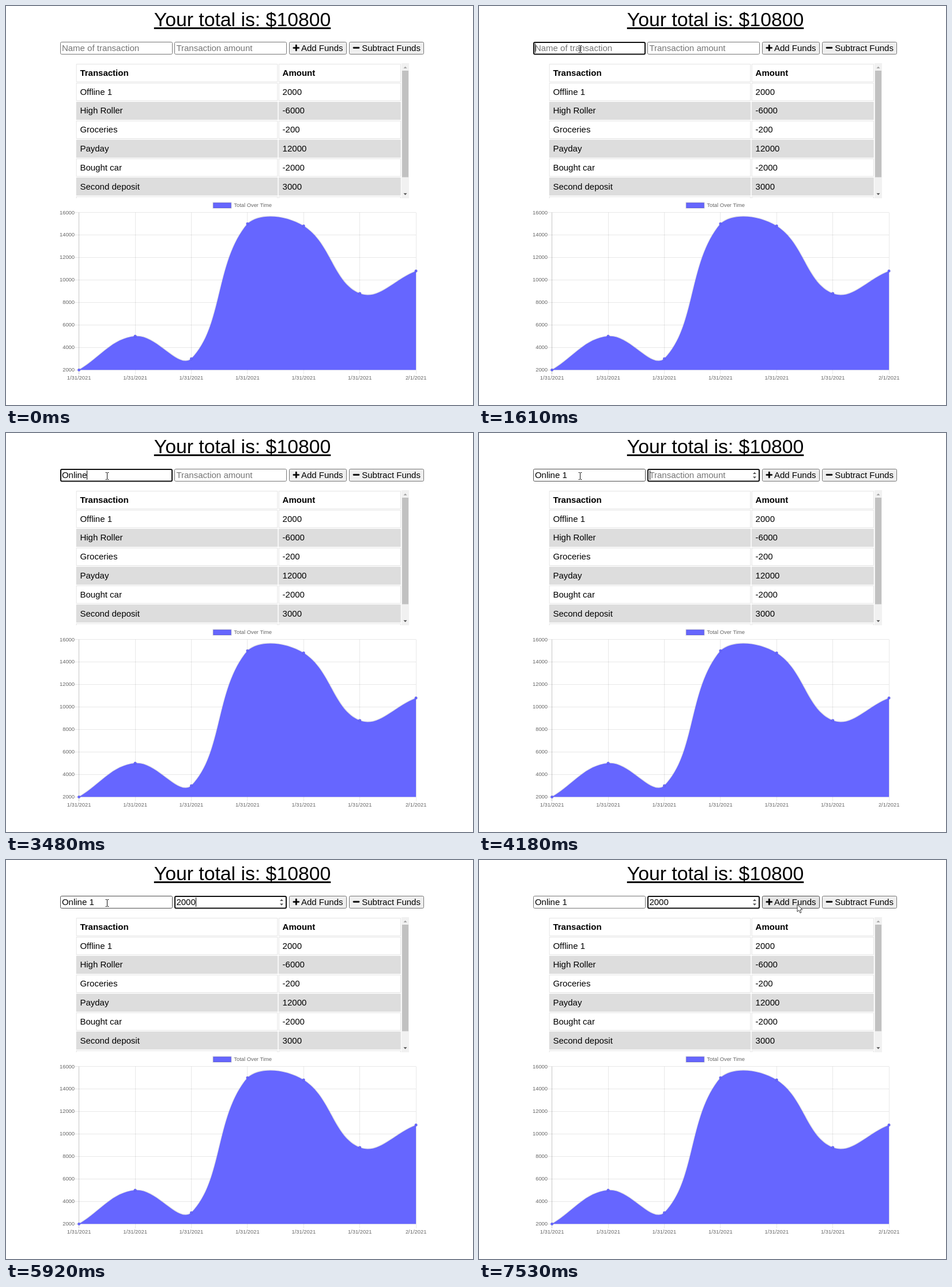
These frames come from a looping animation (810x691 px, 8 s). An HTML page with a canvas:

```html
<!DOCTYPE html>
<html lang="en">
<head>
<meta charset="utf-8">
<title>Budget tracker</title>
<style>
html, body { margin: 0; width: 100%; height: 100%; overflow: hidden; background: #fff; }
canvas { position: absolute; left: 0; top: 0; }
h1 {
  position: absolute; left: 10px; top: 5px; width: 800px; margin: 0;
  font: 33.75px/37px Arial, "Liberation Sans", sans-serif;
  text-align: center; text-decoration: underline;
}
</style>
</head>
<body>
<canvas id="stage" width="810" height="691"></canvas>
<h1>Your total is: $10800</h1>
<script>
const ctx = document.getElementById('stage').getContext('2d');
const LOOP = 8000;
const FAMILY = 'Arial, "Liberation Sans", sans-serif';
const PURPLE = '#6666ff';

// Each entry holds from its time until the next one.
const pointer = [
  [900, 769, 306], [980, 705, 286], [1060, 545, 228], [1130, 372, 164],
  [1210, 238, 111], [1290, 180, 83.5], [1360, 177, 79], [1440, 175.5, 75], [1520, 175.5, 74.5],
  [6600, 245, 165], [6680, 339, 264], [6910, 400, 244], [6990, 446, 205],
  [7070, 488, 160], [7150, 519, 122], [7220, 538, 97], [7300, 548, 83], [7380, 552, 77]
];
const nameTyping = [[0, ''], [2700, 'O'], [3020, 'On'], [3090, 'Onl'], [3260, 'Onli'],
  [3480, 'Online'], [3880, 'Online '], [3950, 'Online 1']];
const amountTyping = [[0, ''], [5050, '2'], [5520, '20'], [5750, '200'], [5920, '2000']];
const caretTimes = [[1610, 2140], [2600, 4730], [5050, 6450], [6990, 7530]];
const rows = [
  ['Transaction', 'Amount'], ['Offline 1', '2000'], ['High Roller', '-6000'], ['Groceries', '-200'],
  ['Payday', '12000'], ['Bought car', '-2000'], ['Second deposit', '3000'], ['', '']
];
const totals = [2000, 5000, 3000, 15000, 14800, 8800, 10800];

const at = (list, t) => list.filter(k => k[0] <= t).pop();

function text(str, x, y, color = '#000', size = 15, align = 'left', weight = '') {
  ctx.font = `${weight} ${size}px ${FAMILY}`;
  ctx.fillStyle = color;
  ctx.textAlign = align;
  ctx.fillText(str, x, y);
}

function rect(x, y, w, h, color) {
  ctx.fillStyle = color;
  ctx.fillRect(x, y, w, h);
}

function shape(points, fill, stroke, width = 1) {
  ctx.beginPath();
  points.forEach(p => ctx.lineTo(...p));
  ctx.closePath();
  ctx.fillStyle = fill;
  ctx.fill();
  if (!stroke) return;
  ctx.strokeStyle = stroke;
  ctx.lineWidth = width;
  ctx.stroke();
}

function box(x, y, w, h, fill, stroke, width = 1, radius = 2) {
  ctx.beginPath();
  ctx.roundRect(x, y, w, h, radius);
  ctx.fillStyle = fill;
  ctx.fill();
  ctx.strokeStyle = stroke;
  ctx.lineWidth = width;
  ctx.stroke();
}

function line(x1, y1, x2, y2, color, width = 1) {
  ctx.beginPath();
  ctx.moveTo(x1, y1);
  ctx.lineTo(x2, y2);
  ctx.strokeStyle = color;
  ctx.lineWidth = width;
  ctx.stroke();
}

function triangle(x, y, h, color, half = 3) {
  shape([[x - half, y], [x + half, y], [x, y + h]], color);
}

function drawCell(x, y, w, label, labelX, shaded, weight) {
  const h = 31.2, edge = .8;
  rect(x, y, w, h, '#ddd');
  if (!shaded) rect(x + edge, y + edge, w - 2 * edge, h - 2 * edge, '#fff');
  text(label, labelX, y + 20.5, '#000', 15, 'left', weight);
}

function drawTable() {
  ctx.save();
  ctx.beginPath();
  ctx.rect(120, 98, 580, 235);
  ctx.clip();
  rows.forEach(([name, amount], i) => {
    const y = 100.4 + 32.78 * i;
    const shaded = i && i % 2 === 0;
    const weight = i ? '' : 'bold';
    drawCell(121.7, y, 349.6, name, 128.4, shaded, weight);
    drawCell(472.8, y, 212, amount, 479.6, shaded, weight);
  });
  ctx.restore();
  rect(686, 99, 13, 234, '#f1f1f1');
  rect(687, 112, 11, 184.5, '#c1c1c1');
  triangle(692.5, 108, -3.2, '#a3a3a3');
  triangle(692.5, 324.3, 3.2, '#505050');
}

function drawChart() {
  const top = 357.6, bottom = 630.3;
  const px = i => 126.6 + 97.42 * i;
  const py = v => bottom - (v - 2000) * (bottom - top) / 14000;
  const grid = 'rgba(0,0,0,.1)';
  for (let i = 0; i < 7; i++) {
    const x = Math.floor(px(i)) + .5;
    line(x, top, x, 638, i ? grid : 'rgba(0,0,0,.25)', .9);
    text(i < 6 ? '1/31/2021' : '2/1/2021', px(i), 646.6, '#666', 9.375, 'center');
  }
  for (let v = 2000; v <= 16000; v += 2000) {
    const y = Math.floor(py(v)) + .5;
    line(119, y, 711, y, grid, .9);
    text(v, 119, py(v) + 2.9, '#666', 9.375, 'right');
  }

  // Smooth curve: control points lean along the neighbours' chord, kept inside the plot.
  const pts = totals.map((v, i) => [px(i), py(v)]);
  const handles = pts.map((p, i) => {
    const a = pts[i - 1] || p, b = pts[i + 1] || p;
    const before = Math.hypot(p[0] - a[0], p[1] - a[1]);
    const after = Math.hypot(b[0] - p[0], b[1] - p[1]);
    const lean = k => {
      const [x, y] = p.map((c, j) => c + k * .4 / (before + after) * (b[j] - a[j]));
      return [x, Math.min(bottom, Math.max(top, y))];
    };
    return { from: lean(-before), to: lean(after) };
  });
  const curve = new Path2D();
  curve.moveTo(...pts[0]);
  for (let i = 1; i < pts.length; i++)
    curve.bezierCurveTo(...handles[i - 1].to, ...handles[i].from, ...pts[i]);
  const area = new Path2D(curve);
  area.lineTo(px(6), bottom);
  area.closePath();
  ctx.strokeStyle = grid;
  ctx.lineWidth = 2.3;
  ctx.stroke(curve);
  ctx.fillStyle = PURPLE;
  ctx.fill(area);
  for (const [x, y] of pts) {
    ctx.beginPath();
    ctx.arc(x, y, 2.4, 0, 7);
    ctx.fill();
    ctx.lineWidth = .8;
    ctx.stroke();
  }
  box(359.3, 340.6, 31.3, 9.4, PURPLE, grid, 2.3, 0);
  text('Total Over Time', 395.3, 348.2, '#666', 9.375);
}

function drawInput(x, value, hint, focused, hover, caret) {
  const left = Math.floor(x);
  if (focused) box(left + 1, 63, 193, 20.5, '#fff', '#101010', 2);
  else box(left + .5, 62.5, 194, 21, '#fff', hover ? '#4f4f4f' : '#767676');
  text(value || hint, x + 2.8, 78.3, value ? '#000' : '#757575');
  if (focused && caret) rect(Math.floor(x + 3.5 + ctx.measureText(value).width), 65, 1, 16, '#000');
}

function drawButton(x, w, label, labelX, hover) {
  box(x + .5, 62.5, w - 1, 21, hover ? '#e5e5e5' : '#efefef', hover ? '#4f4f4f' : '#767676');
  text(label, labelX, 78.3);
}

function drawPointer(x, y, beam) {
  if (beam) {
    line(x, y - 5.5, x, y + 5.5, '#111', 1);
    for (const end of [-6, 6]) {
      line(x - 2.8, y + end, x - .6, y + end, '#111', 1);
      line(x + .6, y + end, x + 2.8, y + end, '#111', 1);
    }
    return;
  }
  const arrow = [[0, 0], [0, 12.6], [2.9, 9.9], [5, 14.8], [7, 13.9], [5, 9.2], [9, 9]];
  shape(arrow.map(p => [x + p[0], y + p[1]]), '#fff', '#222', .9);
}

function draw(t) {
  const spot = at(pointer, t);
  const [, mx, my] = spot || [0, -99, -99];
  const over = (left, right) => mx > left && mx < right && my > 62 && my < 84;
  const caret = caretTimes.some(([a, b]) => t >= a && t < b);
  const inName = t >= 1610 && t < 4180;
  const inAmount = t >= 4180;

  ctx.clearRect(0, 0, 810, 691);
  drawInput(94.1, at(nameTyping, t)[1], 'Name of transaction', inName, over(94, 289), caret);
  drawInput(292.6, at(amountTyping, t)[1], 'Transaction amount', inAmount, false, caret);
  if (inAmount) {
    triangle(478, 71, -3.2, '#505050');
    triangle(478, 75.6, 3.2, '#505050');
  }
  drawButton(491, 100, 'Add Funds', 512, over(491, 591));
  drawButton(595, 130, 'Subtract Funds', 617.2, false);
  box(497.8, 71.4, 10.9, 2.2, '#000', '#000', .6, .8);
  box(502.2, 67, 2.2, 10.9, '#000', '#000', .6, .8);
  box(602, 71.2, 11, 2.2, '#000', '#000', .6, .8);
  drawTable();
  drawChart();
  if (spot) drawPointer(mx, my, over(94, 289));
}

function frame() {
  draw(performance.now() % LOOP);
  requestAnimationFrame(frame);
}
frame();
</script>
</body>
</html>
```
